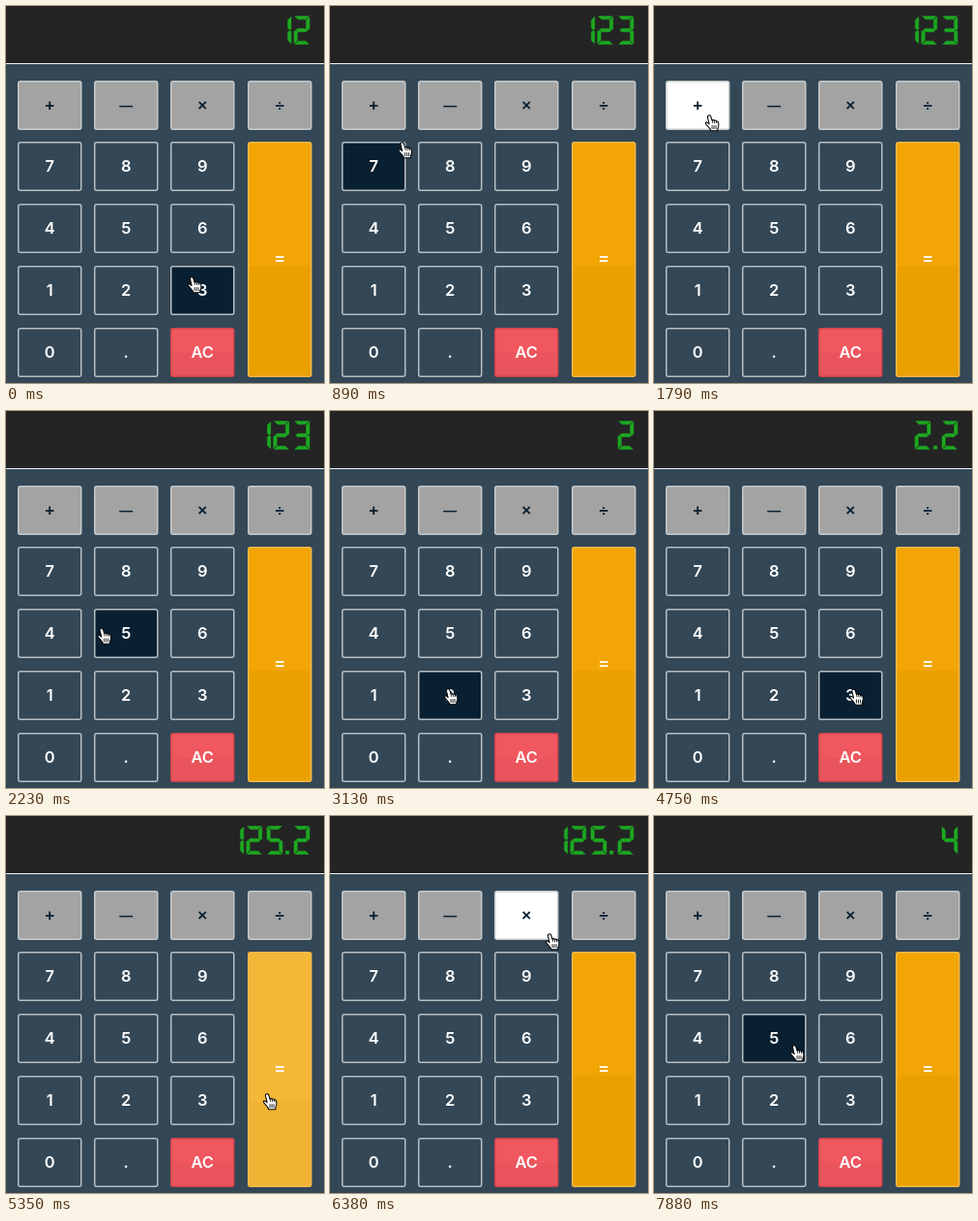
An HTML page that plays this animation: 329x389 px, repeating every 8 s.

```html
<!DOCTYPE html>
<html lang="en">
<head>
<meta charset="utf-8">
<title>Calculator</title>
<style>
html, body { margin: 0; width: 100%; height: 100%; overflow: hidden; background: #334756; }
svg { display: block; width: 329px; height: 389px; }
text { font: 600 16.5px Inter, sans-serif; text-anchor: middle; fill: #fff; }
.key { stroke-width: 1.5; }
.num rect { fill: #334756; stroke: #b6bec3; }
.num.on rect { fill: #092032; }
.op text, .eq text { font: bold 17px "Liberation Sans", Arial, sans-serif; }
.op rect { fill: #a3a3a3; stroke: #c6c9cb; }
.op text { fill: #0a2133; }
.op.on rect { fill: #fff; }
.eq rect { fill: url(#gold); stroke: #f3b94a; }
.eq.on rect { fill: url(#goldOn); }
.ac rect { fill: url(#red); stroke: #cf444d; }
#lcd { fill: #1ca821; stroke: #1ca821; stroke-width: .5; }
</style>
</head>
<body>
<svg viewBox="0 0 329 389">
  <defs>
    <linearGradient id="gold" x2="0" y2="1">
      <stop offset=".525" stop-color="#f2a504"/><stop offset=".525" stop-color="#eba002"/>
    </linearGradient>
    <linearGradient id="goldOn" x2="0" y2="1">
      <stop offset=".64" stop-color="#f4b738"/><stop offset=".64" stop-color="#f0b333"/>
    </linearGradient>
    <linearGradient id="red" x2="0" y2="1">
      <stop offset=".5" stop-color="#f1575f"/><stop offset=".5" stop-color="#ea555d"/>
    </linearGradient>
  </defs>
  <rect width="329" height="389" fill="#334756"/>
  <rect width="329" height="59" fill="#242424"/>
  <rect y="59" width="329" height="1" fill="#f4f5f6"/>
  <g id="keys"></g>
  <g id="lcd" role="img"></g>
  <g id="hand" stroke="#000" stroke-linejoin="round" stroke-linecap="round">
    <path fill="#fff" d="M4.2.8C5.4.4 6 1.2 6.3 2.2L7.4 5.6C8 5 9 5.1 9.4 6C10.2 5.4 11.2 5.7 11.6 6.6C12.6 6.2 13.6 6.9 13.8 8.2C14.1 10 14 12 13 13.6L12.8 16H6.3C6 14.5 4.5 13 3.2 11.4C2.3 10.2.6 8.9 1 8C1.5 7 3 7.5 4.6 9.2L3 2.6C2.8 1.6 3.3 1 4.2.8Z"/>
    <path fill="none" stroke-width=".8" d="M7.4 5.6L7.9 8M9.4 6L9.9 8.2M11.6 6.6L11.9 8.4M7.4 11V14M9.3 11V14M11.2 11V14"/>
  </g>
</svg>
<script>
const LOOP = 8000;
const TICK = 148.4; // the pointer moves in small jumps
const $ = id => document.getElementById(id);

function add(parent, tag, attrs) {
  const el = document.createElementNS("http://www.w3.org/2000/svg", tag);
  for (const k in attrs) el.setAttribute(k, attrs[k]);
  return parent.appendChild(el);
}

// Keypad
const keys = [];

function addKey(label, kind, col, row, last = row) {
  const x = Math.round(12 + 79.2 * col), w = 66.5;
  const top = r => Math.round(76.6 + 63.8 * r);
  const y = top(row), h = top(last) + 51 - y;
  const el = add($("keys"), "g", { class: kind });
  add(el, "rect", { class: "key", x: x + .75, y: y + .75, width: w - 1.5, height: h - 1.5, rx: 2 });
  const text = add(el, "text", { x: x + w / 2, y: y + h / 2 + 5.8 });
  text.textContent = label;
  if (label === "—") text.style.fontSize = "14px";
  keys.push({ el, kind, x, y, w, h });
}

[..."+—×÷"].forEach((s, i) => addKey(s, "op", i, 0));
["789", "456", "123", "0."].forEach((line, r) =>
  [...line].forEach((s, c) => addKey(s, "num", c, r + 1)));
addKey("AC", "ac", 2, 4);
addKey("=", "eq", 3, 1, 4);

// Seven-segment display: three shapes, mirrored about the centre of a digit
const bar = "M-7.2-14.5H7.3L4-11.2H-3.8Z";
const post = "M8-13.8V-1.2L6.6-.3L4.6-2V-10.4Z";
const middle = "M-6.2 0L-4.2-1.7H4.2L6.2 0L4.2 1.7H-4.2Z";
const segs = {
  a: [bar, 1, 1], d: [bar, 1, -1], g: [middle, 1, 1],
  b: [post, 1, 1], c: [post, 1, -1], f: [post, -1, 1], e: [post, -1, -1],
  p: ["M4.6 11H8V14.3H4.6Z", 1, 1]
};
const glyphs = { 1: "bc", 2: "abged", 3: "abgcd", 4: "fgbc", 5: "afgcd", ".": "p" };

function drawNumber(value) {
  const lcd = $("lcd");
  lcd.replaceChildren();
  lcd.setAttribute("aria-label", value);
  let right = 314;
  for (const ch of [...value].reverse()) {
    if (ch === "1") right += 2.2;
    for (const s of glyphs[ch]) {
      const [d, sx, sy] = segs[s];
      add(lcd, "path", { d, transform: `translate(${right - 8} 25) scale(${sx} ${sy})` });
    }
    right -= ch === "." ? 6.8 : ch === "1" ? 9 : 21.2;
  }
}

// Pointer moves: start, end, x, y
const moves = [
  [0, 1, 192, 280],
  [150, 1190, 45, 106],
  [1190, 1780, 57, 113],
  [1780, 2530, 122, 287],
  [3120, 3570, 122, 351],
  [3710, 4160, 123, 288],
  [4400, 5040, 270, 287],
  [5940, 6380, 227, 122],
  [6380, 6680, 209, 104],
  [6830, 7420, 55, 240],
  [7570, 7860, 145, 237]
];
const results = [[0, "12"], [150, "123"], [2680, "2"], [3720, "2."], [4460, "2.2"], [5350, "125.2"], [7730, "4"]];

const ease = p => p * p * (3 - 2 * p);

function pointerAt(t) {
  let [, , x, y] = moves[0];
  for (const [from, to, tx, ty] of moves) {
    const p = ease(Math.min(1, Math.max(0, (t - from) / (to - from))));
    x += (tx - x) * p;
    y += (ty - y) * p;
  }
  return [x, y];
}

let shown = "";
function render(time) {
  const t = time % LOOP;
  const [x, y] = pointerAt(Math.floor((t + 2) / TICK) * TICK);
  $("hand").setAttribute("transform", `translate(${x - 4.7} ${y - 1}) scale(1.05)`);
  for (const k of keys) {
    const over = x >= k.x && x < k.x + k.w && y >= k.y && y < k.y + k.h;
    k.el.setAttribute("class", k.kind + (over ? " on" : ""));
  }
  const value = results.findLast(r => r[0] <= t)[1];
  if (value !== shown) drawNumber(shown = value);
}

const start = performance.now();
function tick() {
  render(performance.now() - start);
  requestAnimationFrame(tick);
}
tick();
</script>
</body>
</html>
```
